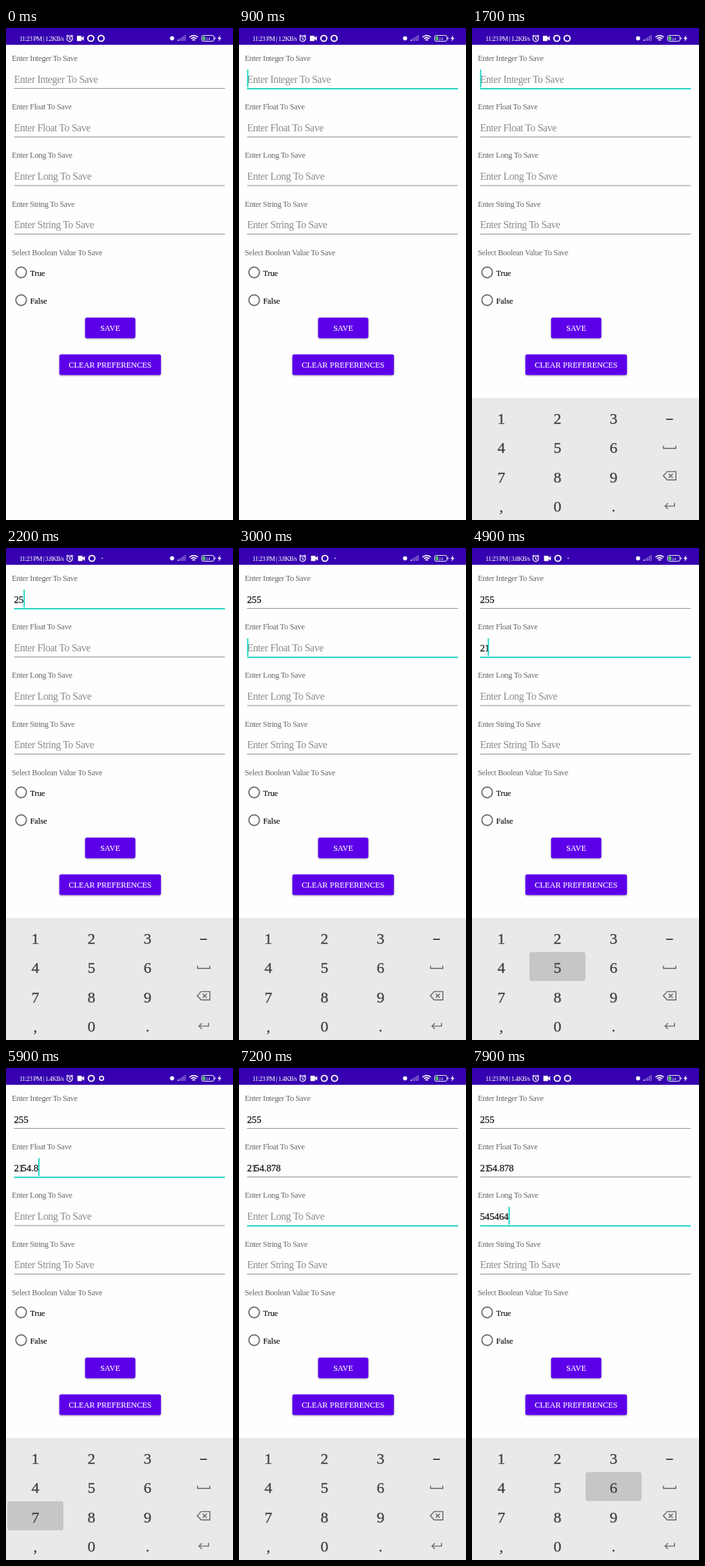
Recreate the animation shown at these times as an HTML page. Size 352 by 762 pixels, loop 8 s.

```html
<!DOCTYPE html>
<html lang="en">
<head>
<meta charset="utf-8">
<style>
  html, body { margin: 0; width: 100%; height: 100%; overflow: hidden; background: #fdfefd; }
  svg { display: block; width: 352px; height: 762px; font-family: "Liberation Serif", serif; }
  .status { font-size: 10px; letter-spacing: -.6px; fill: #fff; }
  .label { font-size: 12.5px; letter-spacing: -.35px; fill: #666; }
  .hint { font-size: 16px; letter-spacing: -.45px; fill: #8c8c8c; }
  .value { font-size: 15px; letter-spacing: -.15px; fill: #111; stroke: #111; stroke-width: .25px; }
  .narrow { letter-spacing: -3px; }
  .option { font-size: 12.5px; fill: #111; letter-spacing: -.1px; stroke: #111; stroke-width: .2px; }
  .button { font-size: 12.2px; letter-spacing: .13px; fill: #fff; text-anchor: middle; stroke: #fff; stroke-width: .15px; }
  .key { font-size: 24px; fill: #444; text-anchor: middle; stroke: #444; stroke-width: .4px; }
  .line { fill: none; stroke: #fff; stroke-width: 1.3px; }
  .glyph { fill: none; stroke: #707270; stroke-width: 1.7px; }
</style>
</head>
<body>
<svg id="stage" viewBox="0 0 352 762"></svg>
<script>
const LOOP = 8000, PITCH = 75.2, KEYS = '123456789,0.';
const FIELDS = ['Integer', 'Float', 'Long', 'String'];
const FOCUS = [600, 3000, 6600];
const CURSOR = [[700, 1200], [1700, 3500], [4000, 4600], [4800, 7200], [7400, LOOP]];
// Each press: field, key, time down, time up. A character is entered on release.
const PRESSES = [
  [0, '2', 1800, 1900], [0, '5', 2100, 2200], [0, '5', 2300, 2500],
  [1, '2', 4600, 4800], [1, '1', 4800, 4900], [1, '5', 4900, 5000], [1, '4', 5000, 5100],
  [1, '.', 5300, 5400], [1, '8', 5700, 5800], [1, '7', 5900, 6000], [1, '8', 6000, 6100],
  ...[...'5454646'].map((key, i) => [2, key, 7300 + i * 100, 7400 + i * 100])
];

const text = (cls, x, y, s, id = '') => `<text class="${cls}" x="${x}" y="${y}" id="${id}">${s}</text>`;
const rect = (x, y, w, h, fill, more = '') =>
  `<rect x="${x}" y="${y}" width="${w}" height="${h}" fill="${fill}" ${more}/>`;
const path = (cls, d, more = '') => `<path class="${cls}" d="${d}" ${more}/>`;
const ring = (x, id) => `<circle class="line" id="${id}" cx="${x}" cy="16" r="4.6" style="stroke-width:2px"/>`;

const field = (name, i) => {
  const y = i * PITCH;
  return text('label', 9, 51 + y, `Enter ${name} To Save`) +
    text('hint', 12.5, 84.5 + y, `Enter ${name} To Save`, 'hint' + i) +
    text('value', 12.5, 84.5 + y, '', 'value' + i) +
    rect(12.5, 93.1 + y, 327, 1, '#858585', `id="rule${i}"`);
};
const option = (name, y) =>
  `<circle cx="23.5" cy="${y}" r="8.2" fill="none" stroke="#6a6a6a" stroke-width="1.9"/>` +
  text('option', 37.5, y + 5, name);
const button = (name, x, y, w, h) =>
  rect(x, y, w, h, '#5d00ea', 'rx="3" filter="url(#shadow)"') + text('button', x + w / 2, y + 20.7, name);
const keyX = i => 2 + i % 3 * 87;
const keyY = i => 580.5 + Math.floor(i / 3) * 45.3;

const statusBar = rect(0, 0, 352, 26, '#3600b0') + text('status', 21, 20, '', 'clock') +
  path('line', 'M94.5 16.5a4.3 4.3 0 1 0 8.6 0a4.3 4.3 0 1 0-8.6 0M98.7 13.8v3l2 1.2M93.6 13l2.6-2.2M104 13l-2.6-2.2') +
  `<g id="icons">${path('', 'M110 12h7v3l3.6-2.6v7.4L117 17v3.2h-7z', 'fill="#fff"')}${ring(131.5, 'ring')}</g>` +
  ring(147.5, 'lastRing') +
  '<circle cx="257.5" cy="16" r="3.2" fill="#fff"/>' +
  [0, 1, 2, 3, 4].map(i => rect(266 + i * 2.7, 18 - i * 1.8, 1.6, 2 + i * 1.8, '#fff', `opacity="${i ? .45 : .9}"`)).join('') +
  path('line', 'M284.5 14.2q6.5-5.2 13 0M286.8 16.7q4.2-3.4 8.4 0M289 19q2-1.6 4 0', 'style="stroke-width:1.7px"') +
  rect(303.5, 11.5, 19, 9, 'none', 'rx="2.5" stroke="#fff"') + rect(305, 13, 4, 6, '#4fc76a', 'rx="1"') +
  rect(323.5, 14.5, 1.2, 3, '#fff') +
  '<text x="309.5" y="18.5" font-size="7" fill="#fff">24</text>' +
  path('', 'M332.5 11l-4.5 5.8h2.8l-1.2 4.2l4.5-5.8h-2.8z', 'fill="#fff"');

const keyboard = rect(0, 573, 352, 189, '#e8eae8') + rect(0, 0, 87, 45, '#c5c7c5', 'rx="4" id="pressed"') +
  [...KEYS].map((key, i) => text('key', keyX(i) + 43.5, keyY(i) + 32.5, key)).join('') +
  rect(301, 605, 10.5, 2, '#444') +
  path('glyph', 'M297 647v4.2h19v-4.2M302.5 687h13.7v12.8h-13.7l-5.8-6.4zM305 690.3l6.4 6.4M311.4 690.3l-6.4 6.4') +
  path('glyph', 'M314 735.5v5h-14.5M303.8 736l-4.5 4.5l4.5 4.5');

const stage = document.getElementById('stage');
stage.innerHTML = `<filter id="shadow" x="-10%" y="-20%" width="120%" height="150%">
    <feDropShadow dx="0" dy="1.2" stdDeviation="1" flood-opacity=".35"/></filter>` +
  statusBar + FIELDS.map(field).join('') +
  text('label', 9, 351.8, 'Select Boolean Value To Save') +
  option('True', 378.5) + option('False', 421.5) +
  button('SAVE', 122.6, 448.4, 78, 32) + button('CLEAR PREFERENCES', 82.7, 505.6, 157.6, 32) +
  rect(0, 0, 2, 27.5, '#1cd3c4', 'id="cursor"') + `<g id="keyboard">${keyboard}</g>`;

const $ = id => document.getElementById(id);
const set = (id, attrs) => Object.entries(attrs).forEach(([k, v]) => $(id).setAttribute(k, v));
const show = (id, on) => set(id, { visibility: on ? 'visible' : 'hidden' });
const charWidth = c => ({ 1: 4.5, '.': 3.6 })[c] || 7.35;

function drawStatus(t) {
  const phase = t < 2000 ? 0 : t < 5800 ? 1 : 2;
  const shift = [0, 1.7, .7][phase];
  $('clock').textContent = `11:23 PM | ${['1.2', '3.8', '1.4'][phase]}KB/s`;
  set('icons', { transform: `translate(${shift})` });
  const grown = phase === 1 ? 0 : phase === 2 ? Math.min(1, (t - 5700) / 300) : 1;
  set('lastRing', { cx: 147.5 + shift, r: .3 + 4.3 * grown });
  $('lastRing').style.strokeWidth = 1.3 + .7 * grown + 'px';
}

function draw(t) {
  drawStatus(t);
  const focused = FOCUS.filter(start => t >= start).length - 1;
  const values = FIELDS.map((_, i) =>
    PRESSES.filter(([f, , , up]) => f === i && t >= up).map(p => p[1]).join(''));

  values.forEach((value, i) => {
    const on = i === focused;
    show('hint' + i, !value);
    $('value' + i).innerHTML = value.replace('1', '<tspan class="narrow">1</tspan>');
    set('rule' + i, { height: on ? 2 : 1, fill: on ? '#12d3c3' : '#858585' });
  });

  show('cursor', CURSOR.some(([from, to]) => t >= from && t < to));
  if (focused >= 0) {
    const width = [...values[focused]].reduce((sum, c) => sum + charWidth(c), 0);
    set('cursor', { x: 12.5 + width, y: 64.5 + focused * PITCH });
  }

  const press = PRESSES.find(([, , down, up]) => t >= down && t < up);
  show('pressed', press);
  if (press) {
    const i = KEYS.indexOf(press[1]);
    set('pressed', { x: keyX(i), y: keyY(i) });
  }
  const hidden = 1 - Math.min(1, Math.max(0, (t - 1000) / 300));
  set('keyboard', { transform: `translate(0 ${190 * hidden ** 2})` });
}

function tick() {
  draw(Math.floor(performance.now() % LOOP / 100) * 100);
  requestAnimationFrame(tick);
}
tick();
</script>
</body>
</html>
```
